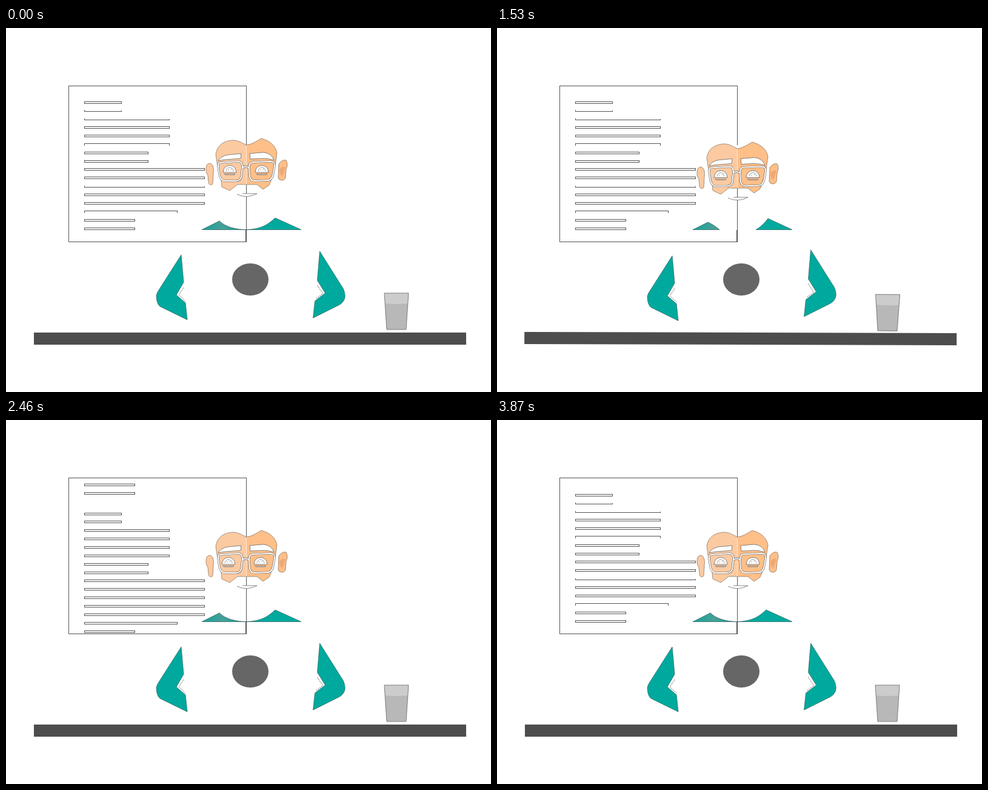
An HTML page for the animation above (4.14 s loop, 800 by 600 pixels).

```html
<!DOCTYPE html>
<html lang="en">
<head>
<meta charset="utf-8">
<title>Desk</title>
<style>
html, body { margin: 0; width: 100%; height: 100%; overflow: hidden; background: #fff; }
svg { display: block; width: 800px; height: 600px; }
.teal { fill: #00a99d; stroke: #1d4b48; stroke-width: .6; }
.white { fill: #fff; stroke: #555; stroke-width: .7; }
.skin { fill: url(#skin); stroke: #6b5847; stroke-width: .6; }
.line { fill: none; stroke: #555; stroke-width: 1; shape-rendering: crispEdges; }
.dash { fill: none; stroke: #333; stroke-width: .8; stroke-dasharray: 2 1.5; }
.rim { fill: none; stroke: #555; stroke-width: 3.2; }
.gap { fill: none; stroke: #fff; stroke-width: 2; }
#windows { stroke: #777; }
</style>
</head>
<body>
<svg viewBox="0 0 800 600">
  <defs>
    <linearGradient id="skin" gradientUnits="userSpaceOnUse" x1="396" x2="397" y1="0" y2="0">
      <stop stop-color="#fccaa1"/><stop offset="1" stop-color="#ffbf88"/>
    </linearGradient>
    <linearGradient id="sleeve" gradientUnits="userSpaceOnUse" x1="325" x2="396" y1="0" y2="0">
      <stop stop-color="#18a398"/><stop offset=".45" stop-color="#45a098"/><stop offset="1" stop-color="#179f95"/>
    </linearGradient>
    <clipPath id="page"><rect x="104" y="95" width="292" height="257"/></clipPath>
    <path id="lenses" d="M353 222L384 220Q390 221 390 229L388 246Q386 252 379 252L360 252Q354 251 352 242L350 229Q349 223 353 222Z
      M407 221L437 220Q444 220 443 228L440 244Q437 251 432 251L410 252Q403 251 402 245L401 229Q401 222 407 221ZM389 231Q395 226 402 231"/>
    <g id="eye">
      <path class="white" d="M-11 2Q-10-9 0-9.500Q10-9 11 2Z"/>
      <path class="white" d="M-9 4.500H9L7 6H-7Z"/>
      <path fill="none" stroke="#777" stroke-width=".7" d="M-6 0Q-5-6 0-6Q5-6 6 0M-2-1V-3M2-2L3-4"/>
    </g>
  </defs>

  <path class="line" d="M396.5 95.5H103.5V352.5H396.5M396.5 95V193M396.5 258V353M395.5 333V353"/>
  <g clip-path="url(#page)"><path class="line" id="rows"/></g>

  <path class="teal" id="left" style="fill:url(#sleeve)"/>
  <path class="teal" id="right"/>

  <g id="head">
    <path class="skin" d="M330 232Q330 223 337 223Q344 226 342 240L341 257Q336 261 334 255L333 243Q329 238 330 232Z"/>
    <path class="skin" d="M450 224Q456 216 462 218Q466 224 462 233L461 247Q458 253 451 250L449 247Z"/>
    <path fill="#f2a873" d="M451 233Q457 226 461 230L456 244Q450 242 451 233Z"/>
    <path class="skin" d="M348 222L346 208C348 194 358 186 374 185C384 185 390 190 397 193C407 191 414 186 421 182C434 186 444 192 447 206L444 226L437 252L434 259L424 266L414 258H382L369 268L356 262L355 252L349 226Z"/>
    <path stroke="#fff" stroke-opacity=".6" d="M396.5 194V258"/>
    <path class="white" d="M381 274Q397 282 414 273H390"/>
    <g id="look">
      <path class="white" d="M350 219Q354 211 366 209L388 207L387 215L362 217Q354 218 350 219Z"/>
      <path class="white" d="M402 207L424 205Q438 206 442 218Q434 215 424 215L403 216Z"/>
      <use href="#lenses" class="rim"/>
      <use href="#lenses" class="gap"/>
      <g id="eyes"><use href="#eye" x="369" y="236"/><use href="#eye" x="422" y="236"/></g>
    </g>
  </g>

  <g id="armL">
    <path class="teal" d="M289 374L293 419L281 440L296 453L299 481L254 459Q248 454 248 441Q249 436 252 432Z"/>
    <path class="dash" d="M293 428L285 440L296 450"/>
  </g>
  <g id="armR">
    <path class="teal" d="M517 368L556 430Q560 440 558 446Q556 453 548 457L506 478L509 450L526 437L513 416Z"/>
    <path class="dash" d="M513 424L522 438L511 446"/>
  </g>
  <ellipse cx="403" cy="414.5" rx="30" ry="26.5" fill="#666"/>

  <g id="glass">
    <path fill="#b8b8b8" d="M624 437H664L660 497H628Z"/>
    <path fill="#ccc" d="M624 437H664L663 454Q644 456 625.5 454Z"/>
    <path fill="none" stroke="#666" stroke-width=".8" d="M624 437H664L660 497H628Z"/>
  </g>
  <rect id="table" x="46" y="502" width="713" height="20" fill="#4d4d4d"/>

  <path class="line" id="windows"/>
</svg>
<script>
const LOOP = 4140, STEP = 30, TOP = 121, PITCH = 13.87, SCROLL = 241;
const ROW_ENDS = [190, 190, 269, 269, 269, 269, 234, 234, 327, 327, 327, 327, 327, 282, 212, 212];
const BOTTOM_ONLY = [1, 2, 10], TOP_ONLY = [5, 13];

const $ = id => document.getElementById(id);
const move = (id, value) => $(id).setAttribute('transform', value);
const draw = (id, d) => $(id).setAttribute('d', d);
const mix = (a, b, k) => a + (b - a) * k;
const snap = v => Math.floor(v) + .5;
const part = (t, from, to) => Math.min(1, Math.max(0, (t - from) / (to - from)));
const ease = (t, from, to) => (1 - Math.cos(Math.PI * part(t, from, to))) / 2;
const easeOut = (t, from, to) => 1 - (1 - part(t, from, to)) ** 3;

// Two copies of the text follow each other; at rest some rows show only one edge.
function rowsPath(scroll) {
  const still = scroll === 0 || scroll === SCROLL;
  let d = '';
  for (let i = 0; i < 32; i++) {
    const n = i % 16, end = ROW_ENDS[n];
    const y = snap(TOP + PITCH * n + (i > 15 ? SCROLL + 1 : 0) - scroll);
    if (still && BOTTOM_ONLY.includes(n)) d += `M129.5 ${y}V${y + 3}H${end}V${y + 1}`;
    else if (still && TOP_ONLY.includes(n)) d += `M129.5 ${y + 3}V${y}H${end}V${y + 3}`;
    else d += `M129.5 ${y}H${end}V${y + 3}H129.5Z`;
  }
  return d;
}

// Each window grows from its anchor, then shrinks towards its upper right corner.
function windowPath(t, [x, y, r, b], [ax, ay], start, stop, shape) {
  const grow = easeOut(t, start, start + 400), shrink = 1 - ease(t, stop, stop + 240);
  if (grow * shrink < .01) return '';
  const px = v => snap(mix(r, mix(ax, v, grow), shrink)), py = v => snap(mix(y, mix(ay, v, grow), shrink));
  return shape(px(x), py(y), px(r), py(b));
}

const wide = (x, y, r, b) => `M${x} ${y}V${b}H${r}V${y}M${x} ${b - 2}H${r - 2}V${y}`;
const tall = (x, y, r, b) => `M${x} ${y}H${r}V${b}H${x}ZM${x + 1} ${y + 1}H${r - 1}V${b - 2}H${x + 1}Z`;
const open = (x, y, r, b) => `M${x} ${b}V${y}H${r}V${b}M${x + 2} ${b}V${y + 2}H${r - 2}V${b}`;

function render(t) {
  const lean = ease(t, 30, 510) - ease(t, 1650, 1980);
  const swing = t > 30 && t < 2190 ? Math.sin((t - 30) / 360 * 2 * Math.PI) : 0;
  const tilt = swing * mix(1, .4, part(t, 690, 1530)) * part(t, 0, 300);

  move('table', `translate(${-2.3 * tilt}) rotate(${.46 * tilt} 403 512)`);
  move('glass', `translate(0 ${2.6 * swing}) rotate(${1.5 * tilt} 644 497)`);
  move('armL', `translate(0 ${2 * lean - .5 * swing * lean})`);
  move('armR', `translate(.5 ${-2.3 * lean})`);
  move('head', `translate(0 ${6 * lean})`);
  move('look', `translate(0 ${2.5 * lean})`);

  const gaze = -2 * ease(t, 1650, 1860) + 3.2 * ease(t, 2610, 2820) - 1.2 * ease(t, 3690, 3870);
  move('eyes', `translate(${gaze})`);

  const m = (a, b) => mix(a, b, lean);
  draw('left', `M323 332.5L${m(352, 348)} ${m(318, 320)}C${m(362, 354)} ${m(328, 323)} ${m(378, 361)} ${m(332, 327)} ${m(397, 367)} 332.5Z`);
  draw('right', `M${m(397, 427)} 332.5C${m(420, 435)} ${m(331, 328)} ${m(430, 441)} ${m(326, 322)} ${m(444, 447)} ${m(313, 314)}L487 332.5Z`);
  draw('rows', rowsPath(SCROLL * ease(t, 1722, 2685)));
  draw('windows',
    windowPath(t, [526, 204, 697, 252], [526, 252], 2846, 3630, wide) +
    windowPath(t, [526, 264, 556, 353], [526, 264], 2768, 3540, tall) +
    windowPath(t, [568, 263, 697, 353], [678, 263], 2973, 3450, open));
}

const begin = performance.now();
function tick() {
  const t = Math.max(0, performance.now() - begin) % LOOP;
  render(Math.floor(t / STEP) * STEP);
  requestAnimationFrame(tick);
}
tick();
</script>
</body>
</html>
```
